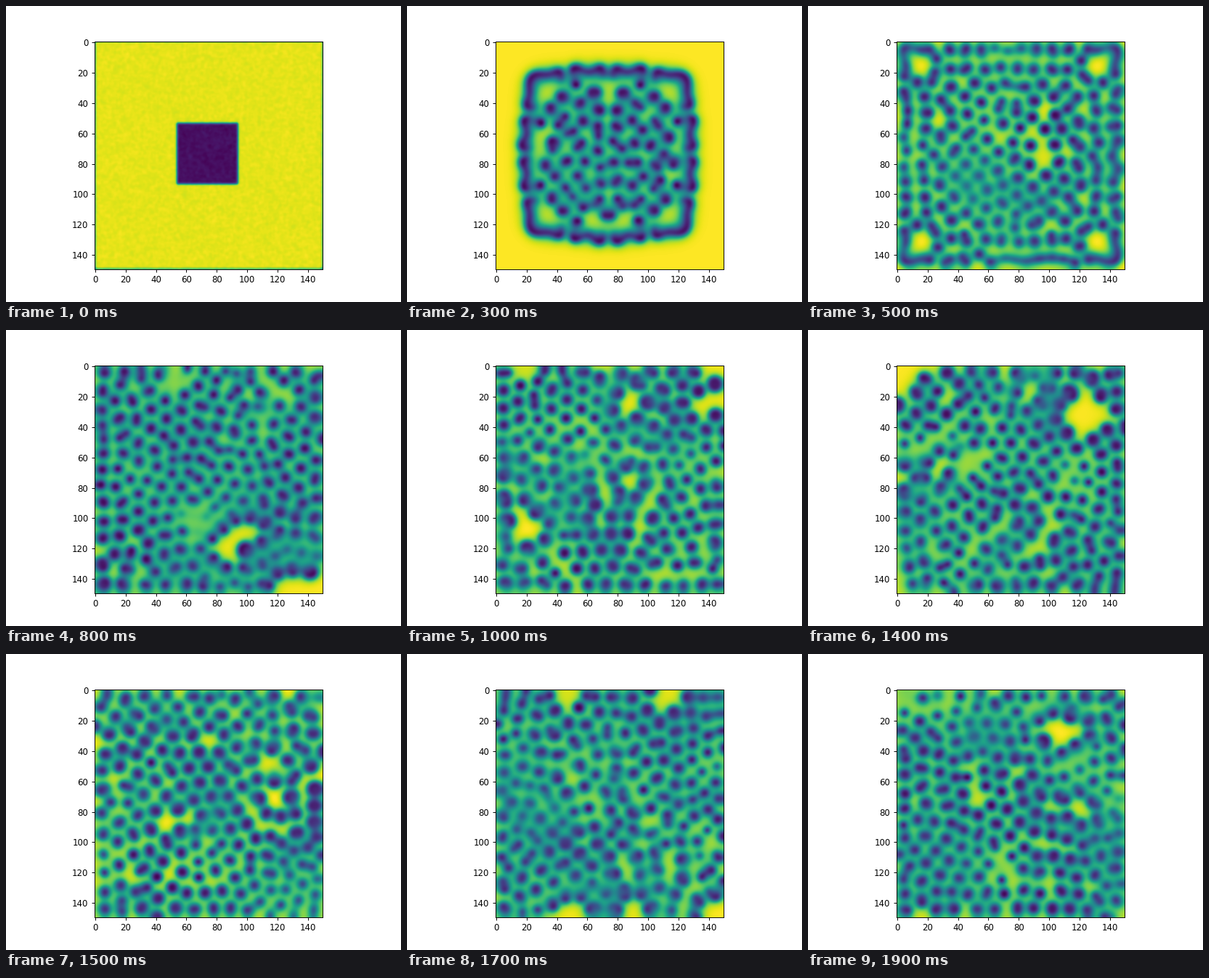
Write a matplotlib script that moves like this. It is 544 px wide and 408 px high and loops after 2000 ms.

```python
import numpy as np
import matplotlib.pyplot as plt
from matplotlib.animation import FuncAnimation

N = 150            # grid cells per side
HALF = 20          # half width of the seeded square
FRAMES = 20
STEPS = 500        # simulation steps per frame
DU, DV, FEED, KILL = 0.14, 0.06, 0.020, 0.055


def lap(z):
    return (z[:-2, 1:-1] + z[2:, 1:-1] + z[1:-1, :-2] + z[1:-1, 2:]
            - 4 * z[1:-1, 1:-1])


def mirror_edges(z):
    z[0], z[-1] = z[1], z[-2]
    z[:, 0], z[:, -1] = z[:, 1], z[:, -2]


def simulate():
    """Gray-Scott reaction-diffusion, one snapshot of u per frame."""
    rng = np.random.RandomState(0)
    uu = np.zeros((N + 2, N + 2), np.float32)
    vv = np.zeros_like(uu)
    u, v = uu[1:-1, 1:-1], vv[1:-1, 1:-1]
    u[:] = 1
    mid = slice(N // 2 - HALF, N // 2 + HALF)
    uu[mid, mid] = 0.50
    vv[mid, mid] = 0.25
    u += 0.05 * rng.random_sample((N, N))
    v += 0.05 * rng.random_sample((N, N))

    # The border starts empty, so the first step darkens the rim.
    shots = []
    for i in range((FRAMES - 1) * STEPS + 1):
        lu, lv = lap(uu), lap(vv)
        uvv = u * v * v
        u += DU * lu - uvv + FEED * (1 - u)
        v += DV * lv + uvv - (FEED + KILL) * v
        mirror_edges(uu)
        mirror_edges(vv)
        if i % STEPS == 0:
            shots.append(u.copy())
    return shots


shots = simulate()
fig, ax = plt.subplots(figsize=(6.4, 4.8), dpi=85)
img = ax.imshow(shots[0], interpolation="bicubic", cmap="viridis")


def draw(i):
    img.set_data(shots[i])
    img.autoscale()
    return [img]


anim = FuncAnimation(fig, draw, frames=FRAMES, interval=100,
                     repeat=True, repeat_delay=0)
plt.show()
```
